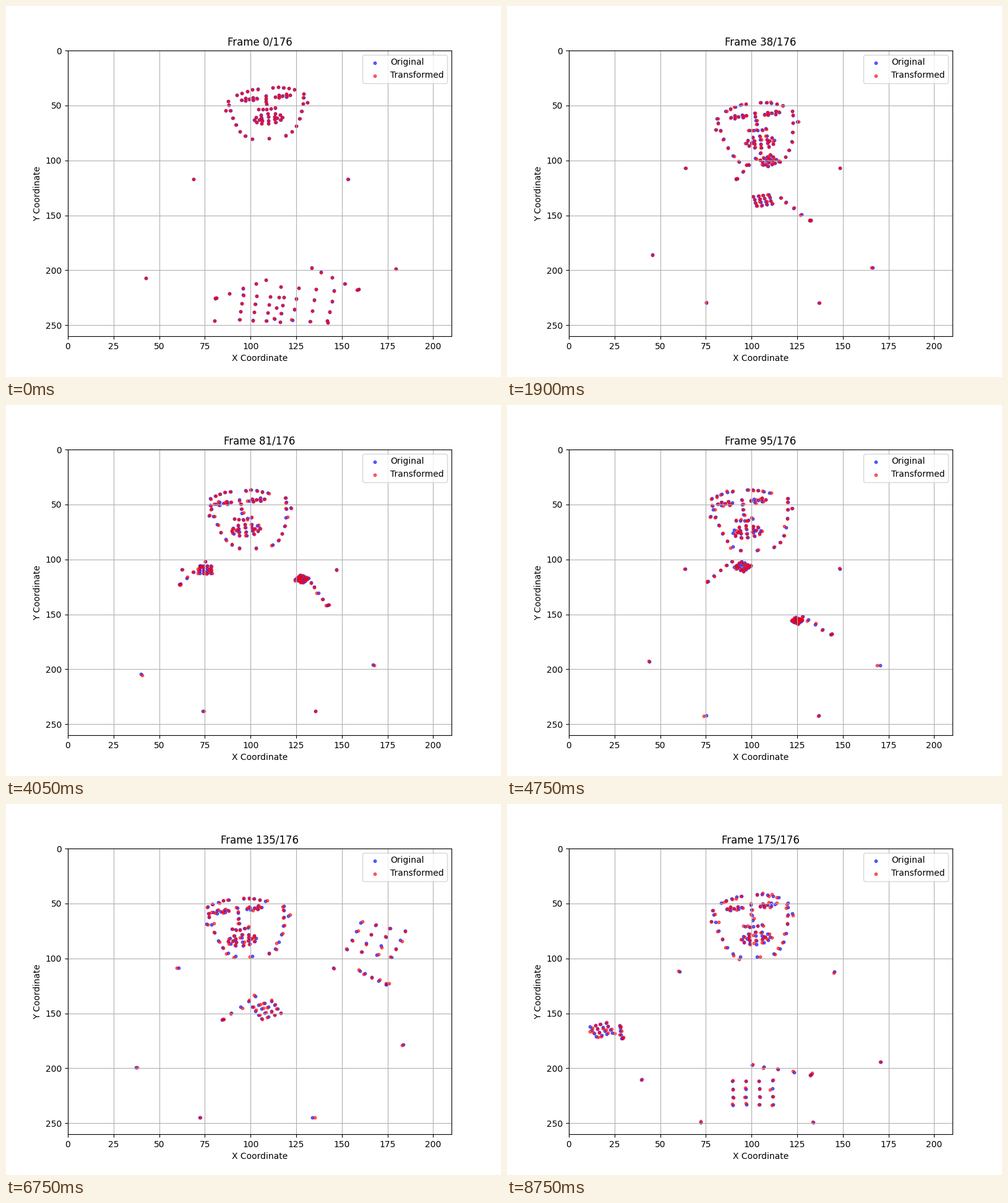
Recreate the animation shown at these times as a matplotlib script. Size 800x600 px, loop 8.8 s.

```python
import numpy as np
import matplotlib.pyplot as plt
from matplotlib.animation import FuncAnimation

FRAMES = 176
KEYS = [0, 38, 60, 81, 109, 135, 175]
SCALE = np.array([620 / 210, 462 / 260])  # pixels per data unit
ASPECT = SCALE[0] / SCALE[1]
HEAD = 61     # half width of the head in pixels
TILT = -6     # rise of the head from centre to right edge

# Key poses in stage pixels, one row per key time.
# Head: centre x, eye line y, height, yaw, chin lean, mouth level
FACE = [
    [420, 148, 66, 0, 5, 0.52],
    [400, 176, 81, 1, 14, 0.54],
    [416, 145, 78, -2, 4, 0.59],
    [391, 156, 75, -13, 13, 0.61],
    [394, 157, 81, -14, 11, 0.63],
    [388, 171, 75, -14, 10, 0.65],
    [393, 166, 81, 1, 11, 0.63],
]
# Torso: centre x, shoulder y, hip y, then left and right elbow
BODY = [
    [428, 280, 509, 226, 440, 630, 425],
    [413, 262, 480, 235, 402, 591, 423],
    [421, 269, 507, 230, 422, 605, 431],
    [409, 266, 495, 221, 435, 593, 420],
    [416, 263, 508, 238, 395, 612, 421],
    [404, 265, 507, 210, 426, 642, 389],
    [404, 271, 515, 217, 446, 604, 417],
]
# Hands: wrist, thumb tip, centre of the fingers
LEFT = [
    [338, 473, 420, 443, 413, 489],
    [370, 280, 409, 238, 424, 250],
    [248, 270, 264, 207, 242, 213],
    [280, 290, 322, 253, 322, 266],
    [365, 281, 403, 252, 439, 256],
    [349, 349, 403, 311, 421, 333],
    [185, 379, 182, 358, 152, 365],
]
RIGHT = [
    [568, 459, 494, 423, 482, 483],
    [489, 347, 442, 310, 413, 314],
    [597, 297, 592, 230, 607, 244],
    [519, 324, 493, 287, 478, 281],
    [526, 418, 462, 396, 459, 416],
    [614, 292, 572, 270, 598, 220],
    [490, 438, 396, 422, 397, 467],
]
# Quick elbow swings: time, left dx, right dx
SWINGS = [(27, -58, 50), (76, -50, 0), (126, 0, 55), (150, -25, 20)]


def pose(n, rows):
    """Eased key pose at frame n."""
    i = min(np.searchsorted(KEYS, n, "right") - 1, len(KEYS) - 2)
    u = (n - KEYS[i]) / (KEYS[i + 1] - KEYS[i])
    u = u * u * (3 - 2 * u)
    a, b = np.array(rows[i], float), np.array(rows[i + 1], float)
    return a + (b - a) * u


def ellipse(x, y, rx, ry, count):
    a = np.arange(count) * 2 * np.pi / count
    return np.column_stack([x + rx * np.cos(a), y + ry * np.sin(a)])


def face(n):
    x, y, height, yaw, lean, mouth = pose(n, FACE)

    def place(pts, turn):
        u, v = np.array(pts).T
        return np.column_stack([x + HEAD * u + turn + lean * v,
                                y + height * v + TILT * u])

    a = np.linspace(0, np.pi, 17)
    c = np.cos(a)
    jaw = np.column_stack([-np.sign(c) * np.sqrt(abs(c)), np.sin(a) ** 1.5])
    ears = [(-1.08, 0.22), (1.08, 0.22)]

    s = np.linspace(0, 1, 5)
    arch = -0.13 - 0.1 * np.sin(s * np.pi / 2)
    inner = []
    for side in (-1, 1):
        inner.append(np.column_stack([side * (0.76 - 0.56 * s), arch]))
        inner.append(ellipse(side * 0.44, 0, 0.2, 0.035, 6))
        inner.append([(side * 0.44, 0)])
    tip = mouth - 0.36
    inner.append(np.column_stack([np.zeros(4), np.linspace(-0.04, tip, 4)]))
    inner.append(np.column_stack([0.44 * (s - 0.5),
                                  tip + 0.11 + 0.02 * np.sin(s * np.pi)]))
    inner.append(ellipse(0.02, mouth, 0.37, 0.12, 12))
    inner.append(ellipse(0.02, mouth, 0.24, 0.045, 8))
    return np.vstack([place(jaw, 0), place(ears, 0),
                      place(np.vstack(inner), yaw)])


def torso(n):
    x, shoulder, hip, lx, ly, rx, ry = pose(n, BODY)
    for peak, left, right in SWINGS:
        k = np.exp(-((n - peak) / 3) ** 2)
        lx, rx = lx + left * k, rx + right * k
    return np.array([(x - 125, shoulder), (x + 125, shoulder),
                     (x - 91, hip), (x + 91, hip), (lx, ly), (rx, ry)])


def hand(n, rows):
    """Thumb as a line from the wrist, fingers as a grid facing it."""
    wrist, thumb, center = pose(n, rows).reshape(-1, 2)
    along = center - thumb
    across = np.array([along[1] * ASPECT, -along[0] / ASPECT])
    pts = [wrist + [2, -1]]
    pts += [wrist + (thumb - wrist) * t for t in (0, 0.28, 0.55, 0.8, 1)]
    steps = np.linspace(-0.43, 0.43, 4)
    pts += [center + along * i + across * j for i in steps for j in steps]
    return np.array(pts)


def to_data(px):
    return (px - [100, 72]) / SCALE


fig, ax = plt.subplots(figsize=(8, 6), dpi=100)
blue = ax.scatter([], [], s=10, c="blue", alpha=0.6, label="Original")
red = ax.scatter([], [], s=10, c="red", alpha=0.6, label="Transformed")
ax.set_xlim(0, 210)
ax.set_ylim(260, 0)
ax.set_xlabel("X Coordinate")
ax.set_ylabel("Y Coordinate")
ax.grid(True)
ax.legend(loc="upper right")
title = ax.set_title("")


def draw(n):
    rng = np.random.default_rng(n)
    pts = np.vstack([face(n), torso(n), hand(n, LEFT), hand(n, RIGHT)])
    spread = 0.25 + np.sqrt(n / FRAMES)
    shift = rng.normal(0, spread, pts.shape) * [1.5, 1]
    blue.set_offsets(to_data(pts))
    red.set_offsets(to_data(pts + shift))
    title.set_text(f"Frame {n}/{FRAMES}")
    return blue, red, title


anim = FuncAnimation(fig, draw, frames=FRAMES, init_func=lambda: draw(0),
                     interval=50, repeat=True, repeat_delay=0, blit=False)
plt.show()
```
